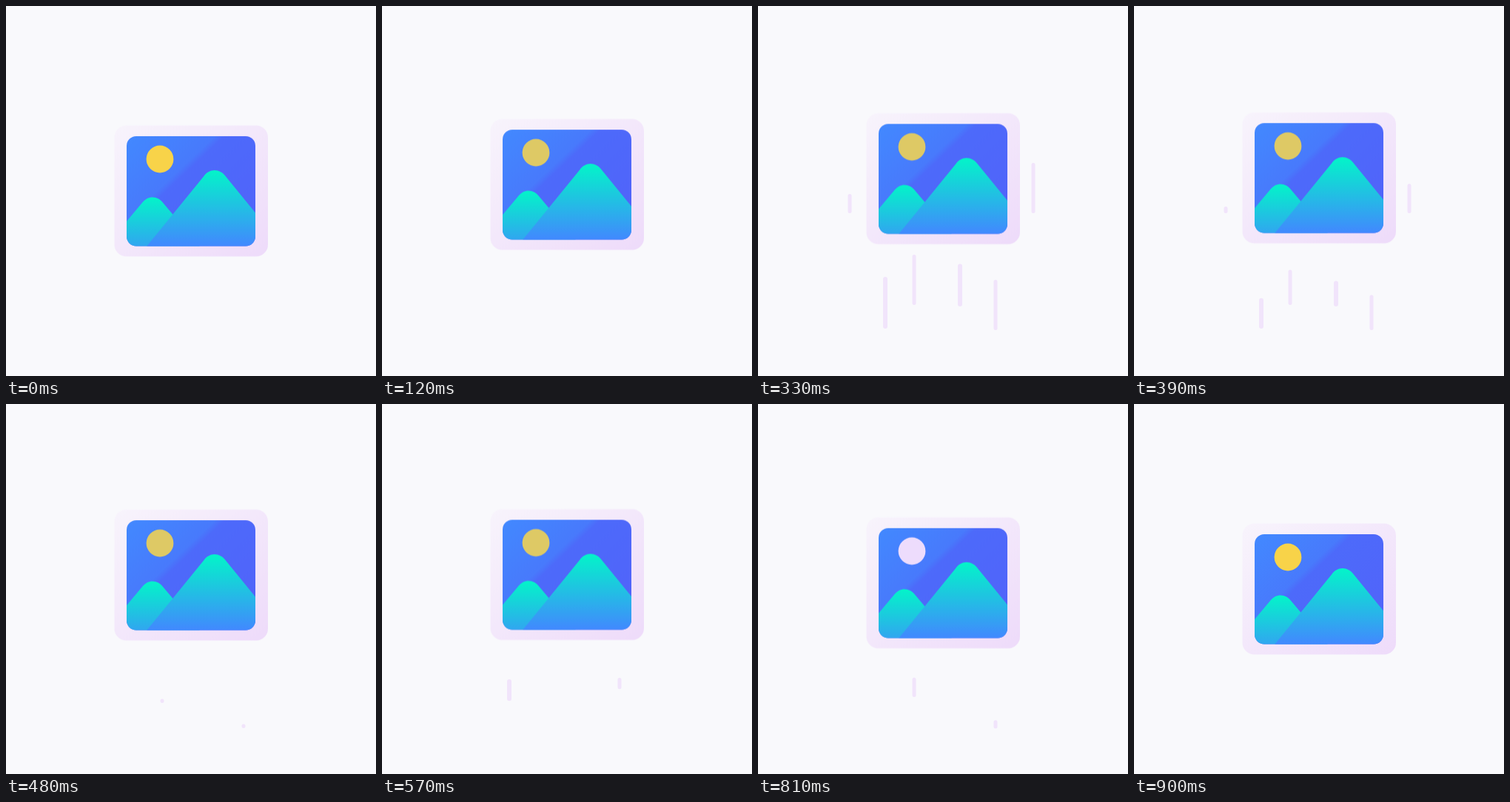
An HTML page for the animation above (930 ms loop, 500 px wide and 500 px high).

```html
<!DOCTYPE html>
<html lang="en">
<head>
<meta charset="utf-8">
<title>Rising picture</title>
<style>
  html, body { margin: 0; width: 100%; height: 100%; overflow: hidden; background: #f9f9fc; }
  svg { display: block; width: 100%; height: 100%; }

  .card { animation: lift 930ms infinite; }
  .sun { animation: tint 930ms step-end infinite; }

  /* Each streak grows down from its top, then shrinks into its foot. */
  .streaks line {
    stroke: #f1e4fb;
    stroke-width: 5;
    stroke-linecap: round;
    stroke-dasharray: 1 3;
    animation: streak 930ms linear var(--at) infinite backwards;
  }
  .streaks .wide { stroke-width: 6; }
  .streaks .quick { animation-name: quick; }

  @keyframes lift {
    0% { transform: translateY(0); animation-timing-function: cubic-bezier(.167, .5, .4, 1); }
    70.97% { transform: translateY(-19.7px); animation-timing-function: cubic-bezier(.333, 0, .667, .75); }
    96.77%, 100% { transform: translateY(0); }
  }
  @keyframes tint {
    0% { fill: #f8d349; }
    3.2% { fill: #dec965; }
    87% { fill: #eddcfc; }
    90.3% { fill: #dec965; }
    96.7%, 100% { fill: #f8d349; }
  }
  @keyframes streak {
    0% { stroke-dashoffset: 1.1; }
    14%, 16% { stroke-dashoffset: 0; }
    32%, 100% { stroke-dashoffset: -1.1; }
  }
  @keyframes quick {
    0% { stroke-dashoffset: 1.1; }
    8%, 12.5% { stroke-dashoffset: 0; }
    20%, 100% { stroke-dashoffset: -1.1; }
  }
</style>
</head>
<body>
<svg viewBox="0 0 500 500">
  <defs>
    <linearGradient id="mat" x1="0" y1="0" x2="1" y2="1">
      <stop offset="0" stop-color="#f8f4fc"/>
      <stop offset="1" stop-color="#eedbfa"/>
    </linearGradient>
    <linearGradient id="sky" gradientUnits="userSpaceOnUse" x1="163" y1="176" x2="320" y2="342">
      <stop offset="0" stop-color="#4289ff"/>
      <stop offset=".36" stop-color="#487afc"/>
      <stop offset=".4" stop-color="#4d6afa"/>
      <stop offset="1" stop-color="#5262fa"/>
    </linearGradient>
    <linearGradient id="peak" gradientUnits="userSpaceOnUse" x1="0" y1="222" x2="0" y2="325">
      <stop offset="0" stop-color="#03f5c9"/>
      <stop offset="1" stop-color="#4288ff"/>
    </linearGradient>
    <linearGradient id="hill" gradientUnits="userSpaceOnUse" x1="0" y1="258" x2="0" y2="350">
      <stop offset="0" stop-color="#03f5c9"/>
      <stop offset="1" stop-color="#4288ff"/>
    </linearGradient>
    <clipPath id="pane"><rect x="163" y="176" width="174" height="148.5" rx="13"/></clipPath>
  </defs>

  <g class="streaks">
    <line pathLength="1" x1="124" y1="239" x2="124" y2="277.5" style="--at:121ms"/>
    <line pathLength="1" x1="172" y1="368.5" x2="172" y2="433" class="wide" style="--at:181ms"/>
    <line pathLength="1" x1="211" y1="338.5" x2="211" y2="401.5" style="--at:198ms"/>
    <line pathLength="1" x1="273" y1="351" x2="273" y2="403" class="wide" style="--at:181ms"/>
    <line pathLength="1" x1="321" y1="372.5" x2="321" y2="435.5" style="--at:198ms"/>
    <line pathLength="1" x1="372" y1="214" x2="372" y2="277.5" style="--at:181ms"/>

    <line pathLength="1" x1="172" y1="375" x2="172" y2="433" class="wide quick" style="--at:537ms"/>
    <line pathLength="1" x1="211" y1="330" x2="211" y2="393.5" style="--at:572ms"/>
    <line pathLength="1" x1="273" y1="342" x2="273" y2="394" class="wide quick" style="--at:580ms"/>
    <line pathLength="1" x1="321" y1="372.5" x2="321" y2="436" style="--at:540ms"/>
  </g>

  <g class="card">
    <rect x="146.5" y="161.5" width="207.5" height="177" rx="16" fill="url(#mat)"/>
    <g clip-path="url(#pane)">
      <rect x="163" y="176" width="174" height="149" fill="url(#sky)"/>
      <circle class="sun" cx="208" cy="207" r="18.4"/>
      <path d="M163 325V291L184 266C192 256 205 256 213 267L262 325Z" fill="url(#hill)"/>
      <path d="M190 325L267 230.5C274.5 219 289 219 297 230.5L337 279.5V325Z" fill="url(#peak)"/>
    </g>
  </g>
</svg>
</body>
</html>
```
